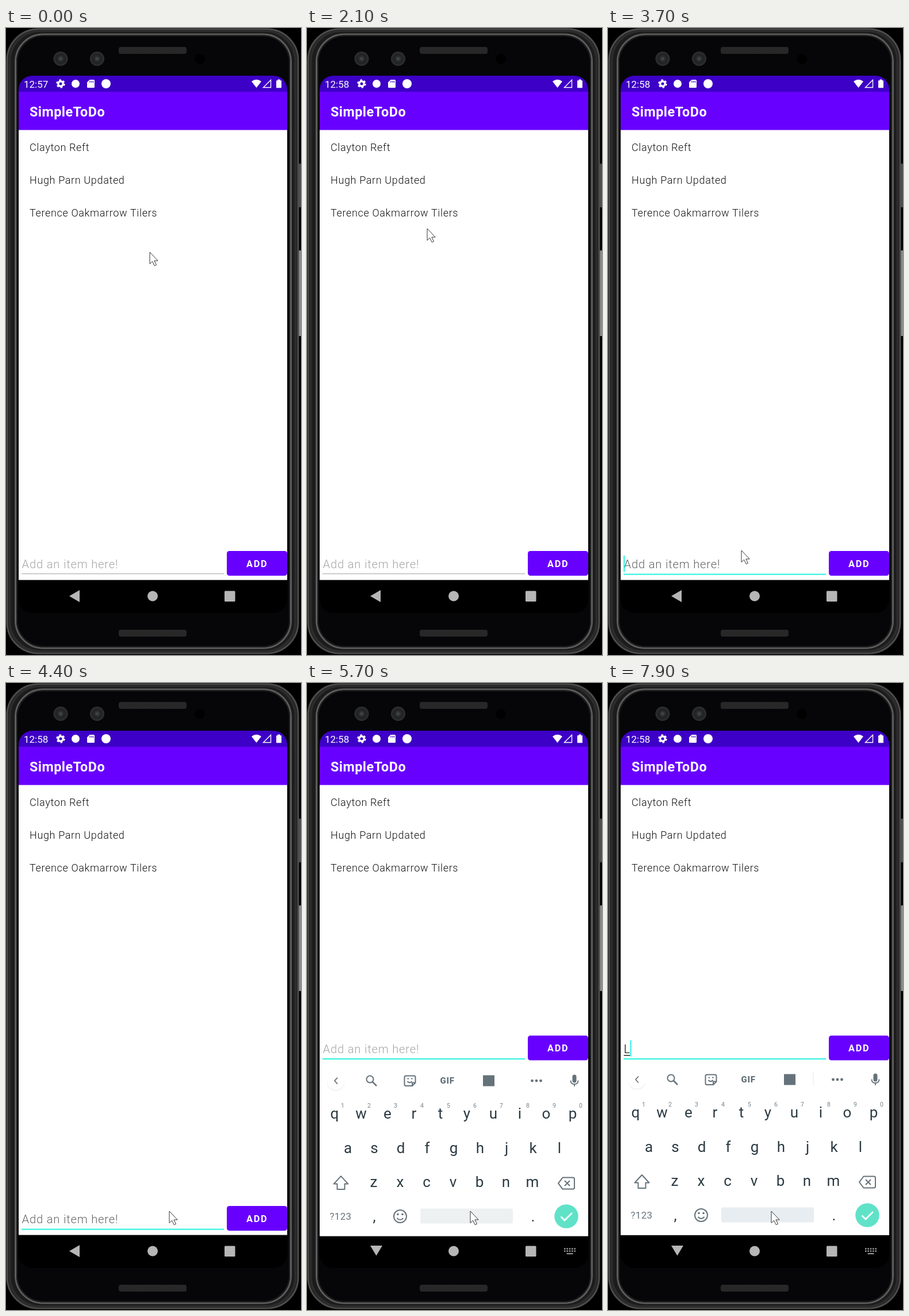
Write an HTML page that moves like this. It is 513x1091 px and loops after 8 s.

```html
<!DOCTYPE html>
<html lang="en">
<head>
<meta charset="utf-8">
<title>To-do list</title>
<style>
html, body { margin: 0; width: 100%; height: 100%; overflow: hidden; background: #000; }
svg { display: block; width: 100%; height: 100%; }
text { font-family: Roboto, sans-serif; white-space: pre; }
.item { font-size: 18px; font-weight: 300; letter-spacing: .65px; fill: #111; }
.field { font-size: 20.2px; font-weight: 300; letter-spacing: .8px; }
.key { font-size: 26px; fill: #2b3a43; text-anchor: middle; }
.num { font-size: 10.5px; fill: #77828a; text-anchor: middle; }
.caps .key { text-transform: uppercase; }
.line { fill: none; stroke: #65727a; stroke-width: 2; stroke-linejoin: round; }
.caps #shift { fill: #65727a; }
</style>
</head>
<body>
<svg viewBox="0 0 513 1091">
  <defs>
    <clipPath id="screen"><rect x="22" y="83" width="467" height="935" rx="24"/></clipPath>
    <pattern id="mesh" width="4" height="4" patternUnits="userSpaceOnUse">
      <rect width="4" height="4" fill="#2d2d2d"/><path d="M0 0h2v2H0zM2 2h2v2H2z" fill="#222"/>
    </pattern>
    <radialGradient id="lens">
      <stop offset="0" stop-color="#4b4d50"/><stop offset=".35" stop-color="#2a2b2d"/>
      <stop offset=".6" stop-color="#202122"/><stop offset="1" stop-color="#303132"/>
    </radialGradient>
  </defs>

  <rect width="513" height="1091"/>
  <rect x="508" y="236" width="6" height="76" rx="2" fill="#505050"/>
  <rect x="508.5" y="387" width="6" height="149" rx="2" fill="#8c8c8c"/>
  <g fill="none">
    <rect x="2" y="2" width="506" height="1086" rx="54" fill="#1c1c1c" stroke="#4c4c4c" stroke-width="3"/>
    <rect x="6.5" y="5" width="497" height="1080" rx="52" stroke="#2c2c2c" stroke-width="4"/>
    <rect x="16.5" y="11" width="479" height="1068" rx="48" fill="#060608" stroke="#5c5c5c" stroke-width="3"/>
    <rect x="19" y="13.5" width="474" height="1063" rx="46" stroke="#1d1d1d" stroke-width="2"/>
  </g>
  <rect x="196" y="33" width="118" height="12" rx="4" fill="url(#mesh)"/>
  <rect x="196" y="1047" width="118" height="12" rx="4" fill="url(#mesh)"/>
  <circle cx="95" cy="53.5" r="12.5" fill="url(#lens)"/>
  <circle cx="158.5" cy="53.5" r="12.5" fill="url(#lens)"/>
  <circle cx="337" cy="54" r="9" fill="#000"/>

  <g clip-path="url(#screen)">
    <rect x="22" y="83" width="467" height="935" fill="#000"/>
    <rect x="22" y="177" width="467" height="783.5" fill="#fff"/>
    <rect x="22" y="83" width="467" height="29" fill="#3d00c6"/>
    <rect x="22" y="111" width="467" height="66.5" fill="#6800ff"/>
    <g fill="#fff">
      <text id="clock" x="31" y="103.5" font-size="17"></text>
      <g fill="none" stroke="#fff">
        <circle cx="95" cy="97" r="4.2" stroke-width="3.4"/>
        <circle cx="95" cy="97" r="6.5" stroke-width="2.4" stroke-dasharray="3.4 3.407"/>
        <path d="M460.5 90.5v13h-13z" stroke-width="1.4"/>
      </g>
      <circle cx="121" cy="97" r="7"/>
      <circle cx="174" cy="97" r="8"/>
      <path d="M145.5 90h7q1.5 0 1.5 1.5v11q0 1.5-1.5 1.5h-10q-1.5 0-1.5-1.5V94.5z"/>
      <path d="M146 92v3M148.8 92v3M151.5 92v3" stroke="#3d00c6" stroke-width="1.2"/>
      <path d="M427 93q8.5-6.5 17 0l-8.5 11z"/>
      <path d="M470 92q0-.8.8-.8h1.7V89.5h4v1.7h1.7q.8 0 .8.8v11.5q0 .8-.8.8h-7.4q-.8 0-.8-.8z"/>
      <text x="41" y="154" font-size="23.4" font-weight="600" letter-spacing=".45">SimpleToDo</text>
    </g>
    <g id="items"></g>

    <g fill="#b6b6b6">
      <path id="back"/>
      <circle cx="255" cy="988.5" r="9"/>
      <rect x="380" y="979.5" width="18.5" height="18.5" rx="1.5"/>
      <path id="imeIcon" d="M447 984.5h20M447 988.5h20" stroke="#999" stroke-width="2.6" stroke-dasharray="2.6 1.75"/>
      <path id="imeBar" d="M451.5 993h11" stroke="#999" stroke-width="2.2"/>
    </g>

    <g id="entry">
      <text id="hint" class="field" x="27.5" y="940">Add an item here!</text>
      <g id="typed">
        <text class="field" x="27.5" y="940" fill="#000">L</text>
        <path d="M27.5 944.5h11" stroke="#222" stroke-width="1.5"/>
      </g>
      <rect id="rule" x="27" width="352"/>
      <rect id="caret" y="918" width="2.2" height="28.5" fill="#38f3e0"/>
      <rect x="384" y="910" width="105" height="43" rx="4.5" fill="#6800ff"/>
      <text x="418" y="937.8" font-size="16.3" font-weight="600" letter-spacing="1.7" fill="#fff">ADD</text>
    </g>

    <g id="board">
      <rect x="22" y="661" width="467" height="299.5" fill="#fff"/>
      <circle cx="50" cy="692" r="15.5" fill="#eee"/>
      <circle cx="50" cy="690.5" r="15.5" fill="#fff"/>
      <g class="line">
        <path d="M53 684.5l-5 5.5 5 5.5" stroke-width="1.7"/>
        <circle cx="109.5" cy="687.5" r="6"/><path d="M114 692l7 7" stroke-width="2.6"/>
        <path d="M172 681.5h14q2.5 0 2.5 2.5v9.5l-5.5 5.5h-11q-2.5 0-2.5-2.5V684q0-2.5 2.5-2.5zM188 693.5h-5v5M174.5 691q4 4.5 8 0"/>
        <path d="M174.5 686.5h2.5M181 686.5h2.5"/>
        <path d="M458.5 689.5q0 6.5 6.5 6.5t6.5-6.5M465 696v4" stroke-width="1.8"/>
        <path id="shift" d="M59 856l12.5 13.5h-6v9.5h-13v-9.5h-6z"/>
        <path d="M444.5 858.5h18q2.5 0 2.5 2.5v15q0 2.5-2.5 2.5h-18l-7.5-10zM448 864l9 9M457 864l-9 9"/>
        <circle cx="162" cy="926" r="11"/><path d="M156.5 929q5.5 6 11 0"/>
      </g>
      <g fill="#65727a">
        <text x="231.5" y="695.2" font-size="15" font-weight="900" letter-spacing=".8">GIF</text>
        <rect x="306" y="680.5" width="20" height="19"/>
        <circle cx="391.5" cy="690" r="2.4"/><circle cx="399" cy="690" r="2.4"/><circle cx="406.5" cy="690" r="2.4"/>
        <rect x="461.5" y="679.5" width="7" height="14" rx="3.5"/>
        <circle cx="158" cy="922.5" r="1.8"/><circle cx="166" cy="922.5" r="1.8"/>
        <text x="39.5" y="932" font-size="16.8" letter-spacing=".4">?123</text>
      </g>
      <path id="divider" d="M357 678v22" stroke="#e4e7e9"/>
      <g id="keys"></g>
      <rect id="space" x="197" y="912.5" width="161" height="26" rx="2"/>
      <circle cx="451" cy="926" r="20.8" fill="#60e2c8"/>
      <path d="M441.5 926.5l6.5 6.5 13-13" fill="none" stroke="#fff" stroke-width="2.7"/>
    </g>
  </g>
  <path id="pointer" d="M0 0v20.5l4.6-4.3 3.7 7.6 3.2-1.5-3.6-7.3h6.3z" fill="#fff" stroke="#333"/>
</svg>
<script>
const LOOP = 8000, STEP = 100, RAISE = 296.5;
const FOCUS = 3500, NAV = 4800, LIFT = 5300, BOARD = 5600, CAPS = 7600, TYPED = 7700, LOWER = 7900;

// pointer waypoints: time, x, y
const path = [
  [0, 250, 390], [300, 226, 425], [600, 186, 465], [900, 192, 446], [1000, 200, 440],
  [1300, 275, 402], [1500, 249, 384], [1600, 249, 384], [1700, 248, 383], [1800, 248, 383],
  [2100, 209, 349], [2300, 209, 349], [2600, 228, 430], [2900, 258, 690], [3200, 262, 841],
  [3500, 238, 907], [3700, 232, 909], [3900, 236, 911], [4100, 264, 918], [4400, 284, 919]
];

const $ = id => document.getElementById(id);
const set = (id, attrs) => { for (const k in attrs) $(id).setAttribute(k, attrs[k]); };
const show = (id, on) => $(id).setAttribute("visibility", on ? "visible" : "hidden");
const label = (cls, x, y, s) => `<text class="${cls}" x="${x}" y="${y}">${s}</text>`;
const row = (s, x, y, cls = "key") => [...s].map((c, i) => label(cls, x + i * 46, y, c)).join("");

$("items").innerHTML = ["Clayton Reft", "Hugh Parn Updated", "Terence Oakmarrow Tilers"]
  .map((s, i) => label("item", 41, 213.5 + i * 57, s)).join("");
$("keys").innerHTML = row("qwertyuiop", 48, 756) + row("1234567890", 62, 736.5, "num") +
  row("asdfghjkl", 71, 815.5) + row("zxcvbnm", 116, 875) +
  label("key", 117, 935, ",") + label("key", 393, 935, ".");

function pointerAt(t) {
  const i = path.findIndex(p => p[0] > t);
  if (i < 0) return path[path.length - 1].slice(1);
  const [t0, x0, y0] = path[i - 1], [t1, x1, y1] = path[i];
  const k = (t - t0) / (t1 - t0);
  return [x0 + (x1 - x0) * k, y0 + (y1 - y0) * k];
}

function draw(t) {
  const focused = t >= FOCUS, ime = t >= NAV, lifted = t >= LIFT, typed = t >= TYPED;
  const blink = t < 4300 || typed || (t - 800) % 1000 < 500;

  $("clock").textContent = t < 1200 ? "12:57" : "12:58";
  set("pointer", { transform: `translate(${pointerAt(t)})` });

  set("back", { d: ime ? "M110 979h21l-10.5 17.5z" : "M110 988.5l18-10.5v21z" });
  show("imeIcon", ime);
  show("imeBar", ime);

  set("entry", { transform: `translate(0 ${lifted ? -RAISE : 0})` });
  set("hint", { fill: focused && !lifted ? "#666" : "#a6a6a6" });
  show("hint", !typed);
  show("typed", typed);
  set("rule", focused ? { y: 949.5, height: 2.2, fill: "#38f3e0" } : { y: 949, height: 1.2, fill: "#b0b0b0" });
  set("caret", { x: typed ? 38.5 : 27 });
  show("caret", focused && blink);

  show("board", t >= BOARD);
  set("board", { transform: `translate(0 ${t < BOARD ? 0 : 36 * Math.exp((BOARD - t) / 35)})` });
  set("space", { fill: t < BOARD + 200 ? "#eef1f2" : "#e8edf1" });
  set("divider", { opacity: t < BOARD + 200 ? 0 : 1 });
  $("board").classList.toggle("caps", t >= CAPS && t < LOWER);
}

function tick() {
  draw(Math.floor(performance.now() % LOOP / STEP) * STEP);
  requestAnimationFrame(tick);
}
tick();
</script>
</body>
</html>
```
